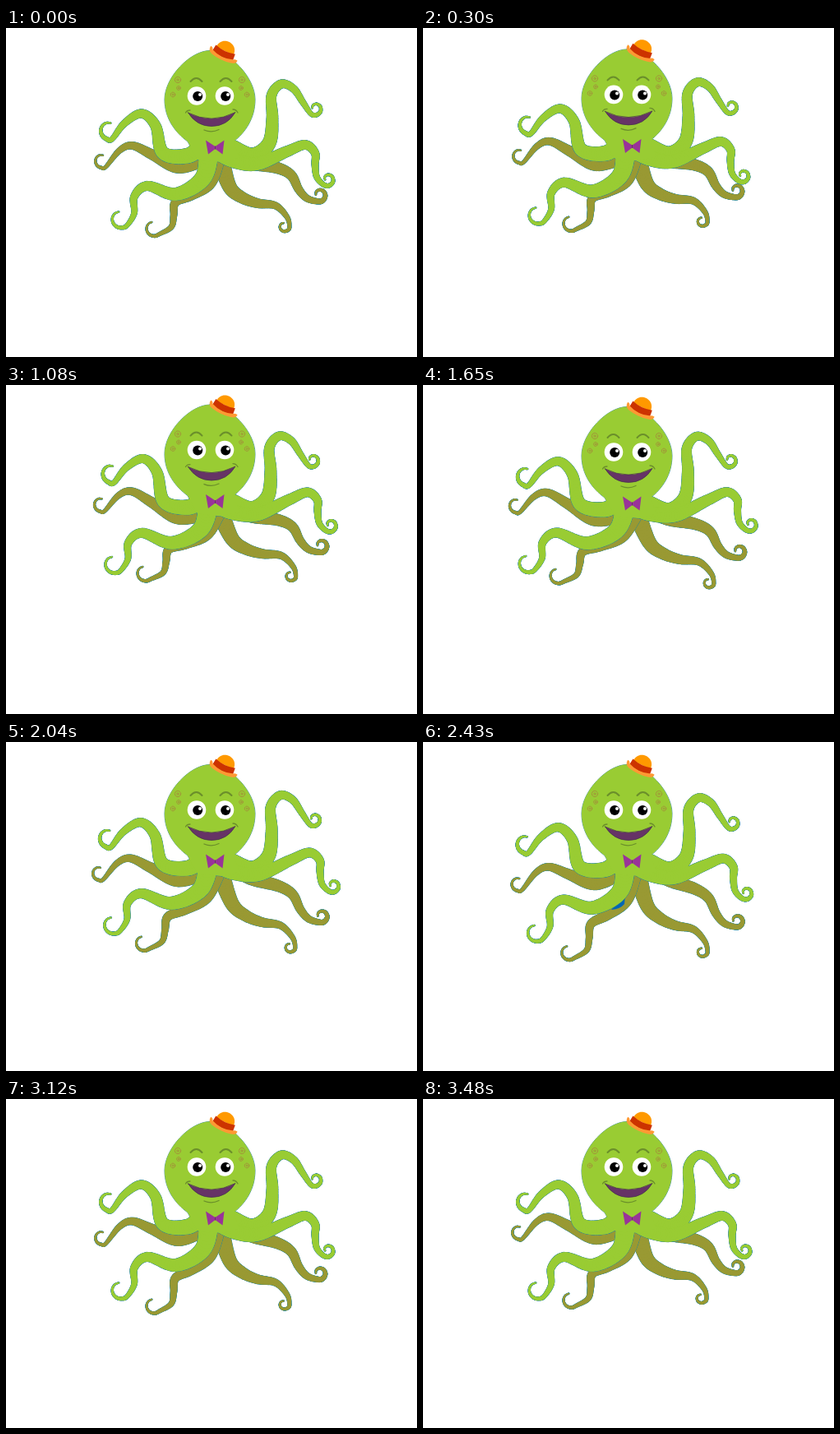
An HTML page with a canvas for the animation above (3510 ms loop, 500 by 400 pixels).

```html
<!DOCTYPE html>
<html lang="en">
<head>
<meta charset="utf-8">
<title>Octopus</title>
<style>
  html, body { margin: 0; width: 100%; height: 100%; overflow: hidden; background: #fff; }
  canvas { display: block; width: 500px; height: 400px; }
</style>
</head>
<body>
<canvas id="stage" width="500" height="400"></canvas>
<script>
const ctx = document.getElementById('stage').getContext('2d');
const LOOP = 3510, STEP = 30, TAU = Math.PI * 2;
const GREEN = '#99cc33', OLIVE = '#999933', EDGE = '#2f8a94', DARK = '#6b8f2b';

// Rises from 0 to 1 between start and peak, then falls back to 0 at end.
function pulse(t, start, peak, end) {
  if (t <= start || t >= end) return 0;
  return t < peak ? Math.sin((t - start) / (peak - start) * TAU / 4)
                  : Math.cos((t - peak) / (end - peak) * TAU / 4);
}

// Spiral tip from angle a to angle b (degrees), tighter toward its inner end.
function curl(x, y, r, a, b) {
  const n = 6;
  return Array.from({ length: n + 1 }, (_, i) => {
    const left = (b - a) * (1 - i / n), k = r * (1 - (left / 400) ** 2);
    const angle = (b - left) * TAU / 360;
    return [x + k * Math.cos(angle), y + k * Math.sin(angle)];
  });
}

// Catmull-Rom samples as [x, y, share of the length]
function spline(p) {
  const n = p.length - 1, sub = 10, out = [[...p[0], 0]];
  let len = 0;
  for (let i = 0; i < n; i++) {
    const q = [p[Math.max(i - 1, 0)], p[i], p[i + 1], p[Math.min(i + 2, n)]];
    for (let j = 1; j <= sub; j++) {
      const s = j / sub, last = out[out.length - 1];
      const [x, y] = [0, 1].map(k => {
        const [a, b, c, d] = q.map(v => v[k]);
        return b + s / 2 * (c - a + s * (2 * a - 5 * b + 4 * c - d + s * (3 * (b - c) + d - a)));
      });
      len += Math.hypot(x - last[0], y - last[1]);
      out.push([x, y, len]);
    }
  }
  return out.map(([x, y, l]) => [x, y, l / len]);
}

// up: first swing, spread: sideways reach, drop: later sag
function arm(tip, bends, width, power, motion) {
  const points = bends.split(' ').map(p => p.split(',').map(Number));
  return { rest: spline([...curl(...tip), ...points]), width, power, spread: 0, drop: 0, end: 2450, ...motion };
}

const rightBack = arm([381, 203, 8, -180, 100], '366,207 356,196 347,179 330,170 300,164 280,155',
  18, 0.8, { up: [0, -9], spread: 3, drop: 15, peak: 750, end: 1700 });
const rightLow = arm([338.5, 241, 6.5, -100, -350], '342,230 328,216 306,213 287,206 272,193 261,160',
  21, 1.1, { up: [2, -11], spread: 9, drop: 14, peak: 750, end: 1700 });
const leftLow = arm([180, 243, 10, -110, -310], '201,242 204,228 206,212 225,203 247,188 256,160',
  20, 1.2, { up: [0, -15], spread: -16, drop: 13, peak: 1100 });
const leftBack = arm([117, 161, 9, -80, -300], '138,149 154,143 178,154 208,168 235,160',
  20, 1.2, { up: [3, -17], spread: -6, drop: 12, peak: 1300 });
const leftTop = arm([126, 124, 11.5, -80, -285], '144,116 165,104 182,119 191,152 222,155 240,140',
  20, 0.9, { up: [6, -17], spread: -5, peak: 1100 });
const leftMid = arm([139.5, 231.5, 11.5, -105, -315], '156,225 156,205 172,192 207,202 240,182 247,145',
  24, 1.1, { up: [0, -16], spread: -12, peak: 1500 });
const rightTop = arm([376, 98, 8, -170, 130], '361,90 350,74 335,68 323,82 324,110 320,140 300,155 275,146',
  20, 0.85, { up: [-5, -7], spread: 2, peak: 1400 });
const rightMid = arm([391, 184, 8, -190, 130], '378,181 376,166 376,152 364,142 342,150 305,165 275,160 255,148',
  20, 0.85, { up: [-7, -15], spread: 14, peak: 1500 });

const BACK = [rightBack, rightLow, leftLow, leftBack];
const FRONT = [leftTop, leftMid, rightTop, rightMid];
const sag = t => pulse(t, 1700, 2550, LOOP);

// The tip swings freely while the root follows the body.
function pose(a, t, lift) {
  const up = pulse(t, 0, a.peak, a.end);
  const dx = a.up[0] * up + a.spread * pulse(t, 500, 1700, 2500);
  const dy = a.up[1] * up + a.drop * sag(t);
  return a.rest.map(([x, y, s]) => {
    const free = 1 - s * s;
    return [x + dx * free, y + dy * free + lift * s * s, 1.5 + (a.width - 1.5) * s ** a.power];
  });
}

function taper(pts, color, extra) {
  ctx.strokeStyle = color;
  ctx.lineCap = 'round';
  for (let i = 1; i < pts.length; i++) {
    ctx.lineWidth = pts[i][2] + extra;
    ctx.beginPath();
    ctx.moveTo(pts[i - 1][0], pts[i - 1][1]);
    ctx.lineTo(pts[i][0], pts[i][1]);
    ctx.stroke();
  }
}

function fill(d, color) {
  ctx.fillStyle = color;
  ctx.fill(new Path2D(d));
}

function line(d, color, width) {
  ctx.strokeStyle = color;
  ctx.lineWidth = width;
  ctx.stroke(new Path2D(d));
}

function disc(x, y, r, color) {
  ctx.fillStyle = color;
  ctx.beginPath();
  ctx.arc(x, y, r, 0, TAU);
  ctx.fill();
}

function shifted(dy, paint) {
  ctx.save();
  ctx.translate(0, dy);
  paint();
  ctx.restore();
}

const HEAD = 'M248 27.5C272 27.5 303 60 303 87C303 110 291 127 277 138L284 158L262 163L233 160L221 138C206 127 193 110 193 87C193 60 224 27.5 248 27.5Z';
const MOUTH = 'M221.5 103Q250 117.5 279 102.5Q269 119.5 250 119.5Q232 119.5 221.5 103Z';

function hat() {
  ctx.save();
  ctx.translate(264.5, 31.5);
  ctx.rotate(0.45);
  fill('M-11.5 -4C-12 -20 12 -20 11.5 -4Z', '#ff9900');
  fill('M-13 -6Q0 -2 13 -6L14 4L-14 4Z', '#cc3300');
  fill('M-18 -2Q-15 -2 -14 1Q0 7 14 1Q16 -1 19 0Q19 5 13 6Q0 9 -13 6Q-19 4 -18 -2Z', '#ff9933');
  ctx.restore();
}

function spot(x, y, r) {
  ctx.strokeStyle = '#a3913a';
  ctx.lineWidth = 1;
  ctx.setLineDash([2, 1]);
  for (const k of [r, r / 3]) {
    ctx.beginPath();
    ctx.arc(x, y, k, 0, TAU);
    ctx.stroke();
  }
  ctx.setLineDash([]);
}

function face() {
  for (const side of [-1, 1]) {
    spot(248 + side * 39, 63, 3.6);
    spot(248 + side * 38, 73, 2.4);
    spot(248 + side * 45, 81, 2.8);
    const brow = 249.5 + side * 18, eye = 249 + side * 17;
    line(`M${brow - 7} 65Q${brow} 57 ${brow + 7} 65`, DARK, 2);
    disc(eye, 82.5, 11.3, '#fff');
    disc(eye + 1.2, 83, 6, '#000');
    disc(eye + 4, 81, 2, '#fff');
  }
  fill(MOUTH, '#663366');
  line(MOUTH, '#44334a', 0.7);
  line('M218.5 103Q220 100 224 100M276 99Q280 99 282 103', DARK, 1.3);
  line('M241 124Q250 128 259 123.5', DARK, 1.3);
  fill('M243 136.5L254.5 144L265.5 136.5L263.5 153.5L254.5 147L246 153.5Z', '#993399');
  line('M254.5 144V147', '#663366', 1);
}

function draw(t) {
  const lift = -3.5 * pulse(t, 0, 1000, 1800);
  ctx.clearRect(0, 0, 500, 400);

  for (const a of BACK) {
    const pts = pose(a, t, lift);
    taper(pts, EDGE, 0.9);
    taper(pts, OLIVE, 0);
  }
  // the deepest sag opens a gap behind the arms
  if (sag(t) > 0.8) fill('M229 204L246 186L245 197Q240 203 229 204Z', '#0066b3');

  const front = FRONT.map(a => pose(a, t, lift));
  front.forEach(pts => taper(pts, EDGE, 0.9));
  shifted(lift, () => line(HEAD, EDGE, 0.9));
  front.forEach(pts => taper(pts, GREEN, 0));
  shifted(lift, () => {
    fill(HEAD, GREEN);
    hat();
    face();
  });
}

function tick() {
  draw(Math.floor(performance.now() % LOOP / STEP) * STEP);
  requestAnimationFrame(tick);
}
tick();
</script>
</body>
</html>
```
